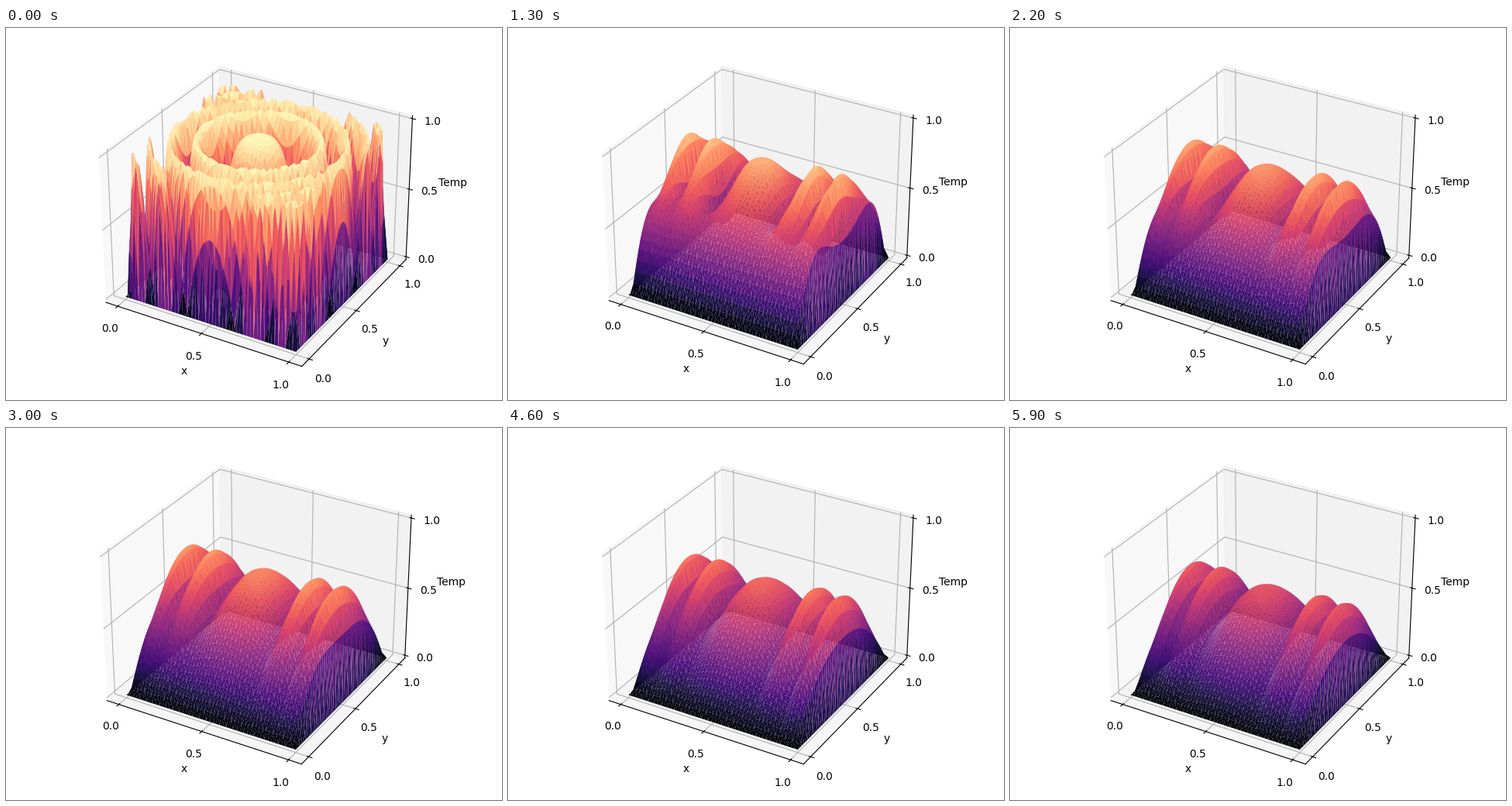
A matplotlib script that plays this animation: 640x480 px, repeating every 6 s.

```python
import numpy as np
import matplotlib.pyplot as plt
from matplotlib.animation import FuncAnimation
from matplotlib.tri import Triangulation

WIDTH, HEIGHT, DPI = 640, 480, 100
FRAMES, INTERVAL = 60, 100
PAD = 15                # pixels kept free around the plot
N = 51                  # grid nodes per side
DIFFUSION = 6.5e-4      # diffusivity times the time of one frame

# Initial temperature: concentric rings, cold walls on all four sides
axis = np.linspace(0, 1, N)
X, Y = np.meshgrid(axis, axis)
start = np.abs(np.cos(10 * np.pi * ((X - 0.5) ** 2 + (Y - 0.5) ** 2)))
start[[0, -1], :] = 0
start[:, [0, -1]] = 0

# Sine modes that vanish at y = 0 and y = 1
k = np.arange(N)
modes = np.sqrt(2 / (N - 1)) * np.sin(np.pi * np.outer(k, k) / (N - 1))
spectrum = modes @ start

mesh = Triangulation(X.ravel(), Y.ravel())
corners_x = mesh.x[mesh.triangles]
corners_y = mesh.y[mesh.triangles]


def temperature(step):
    """Heat spreads along y only; every sine mode decays on its own."""
    if step == 0:
        return start
    decay = np.exp(-(k * np.pi) ** 2 * DIFFUSION * step)
    return modes @ (decay[:, None] * spectrum)


def square(bottom):
    """Centred square, in figure fractions, from the top pad to a height."""
    side = HEIGHT - PAD - bottom
    return [0.5 - side / 2 / WIDTH, bottom / HEIGHT,
            side / WIDTH, side / HEIGHT]


FIRST_BOX = square(PAD)

fig = plt.figure(figsize=(WIDTH / DPI, HEIGHT / DPI), dpi=DPI)
ax = fig.add_axes(FIRST_BOX, projection="3d")
surface = ax.plot_trisurf(mesh, start.ravel(), cmap="magma",
                          vmin=0, vmax=1, linewidth=0)

ticks = [0, 0.5, 1]
ax.set_xticks(ticks)
ax.set_yticks(ticks)
ax.set_zticks(ticks)
ax.set_xlabel("x")
ax.set_ylabel("y")
ax.set_zlabel("Temp")

side_margin = 0.05 + 1.1 / 48
ax.set_xlim(-side_margin, 1 + side_margin, view_margin=0)
ax.set_ylim(-side_margin, 1 + side_margin, view_margin=0)
ax.set_zlim(-1 / 48, 1 + 1 / 48, view_margin=0)

# After the first frame the box shrinks so that the labels keep the pad too
fig.canvas.draw()
overhang = ax.bbox.y0 - ax.get_tightbbox().y0
BOX = square(PAD + overhang)


def update(step):
    ax.set_position(FIRST_BOX if step == 0 else BOX)
    corners_z = temperature(step).ravel()[mesh.triangles]
    surface.set_verts(np.stack([corners_x, corners_y, corners_z], axis=-1))
    surface.set_array(corners_z.mean(axis=1))
    return [surface]


anim = FuncAnimation(fig, update, frames=FRAMES, interval=INTERVAL,
                     repeat=True, repeat_delay=0, blit=False)
plt.show()
```
